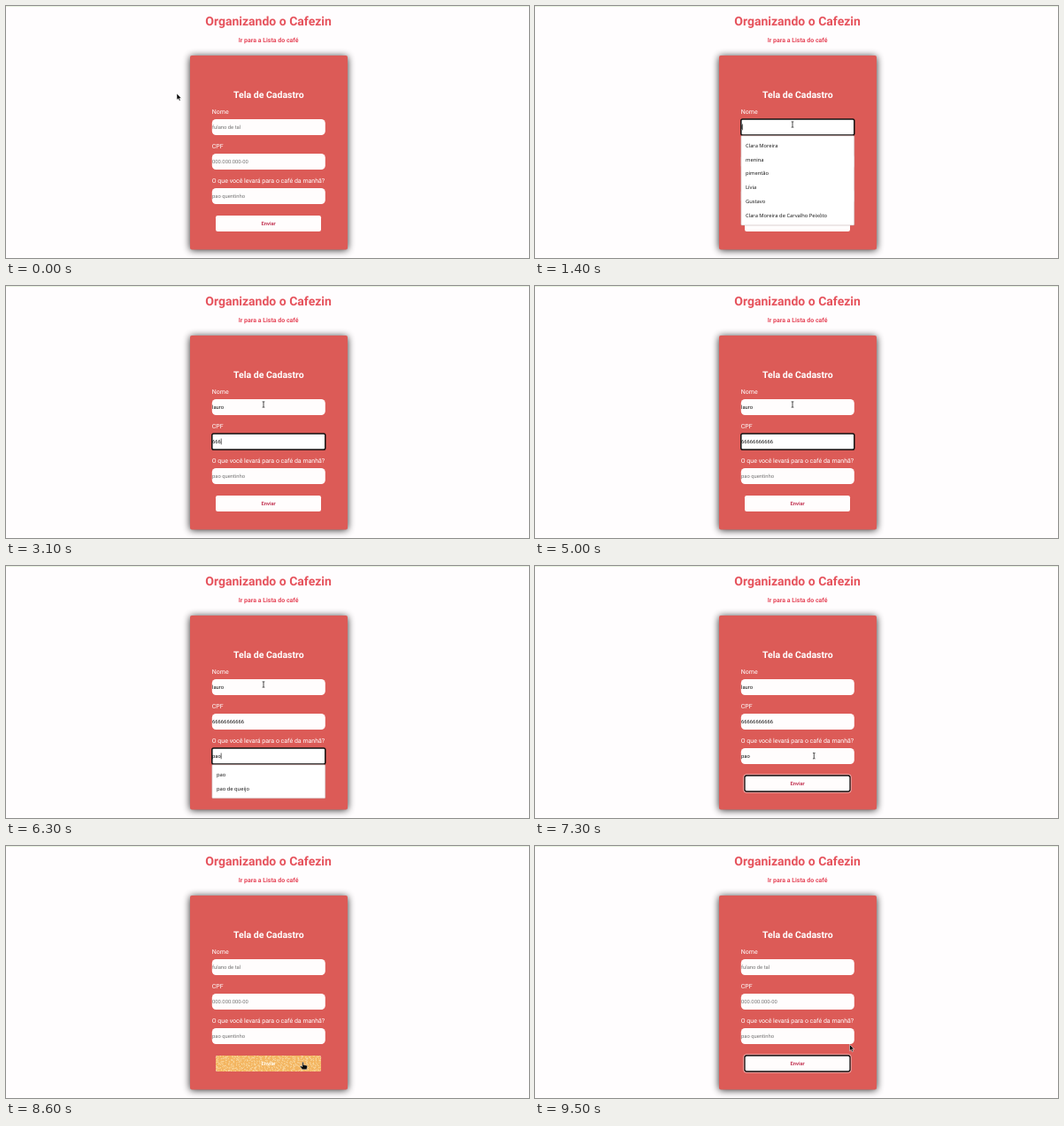
These frames come from a looping animation (591x285 px, 9600 ms). An HTML page:

```html
<!DOCTYPE html>
<html lang="pt-BR">
<head>
<meta charset="utf-8">
<title>Organizando o Cafezin</title>
<style>
  html, body { margin: 0; width: 100%; height: 100%; overflow: hidden; background: #fffdfe; }
  svg { display: block; width: 100%; height: 100%; }
  text { font-family: Roboto, sans-serif; font-size: 5.84px; text-rendering: geometricPrecision; white-space: pre; }
  .head { font-size: 14px; font-weight: 700; fill: #e6535d; text-anchor: middle; }
  .link { font-size: 7px; font-weight: 700; fill: #e6475a; text-anchor: middle; }
  .title { font-size: 10.5px; font-weight: 700; fill: #fff; text-anchor: middle; }
  .label { font-size: 7px; fill: #fff; }
  .send { font-weight: 700; text-anchor: middle; }
  .option { font-family: "Noto Sans", sans-serif; font-size: 5.78px; font-weight: 500; fill: #1c1c1c; }
</style>
</head>
<body>
<svg id="stage" viewBox="0 0 591 285">
  <defs>
    <filter id="blur" x="-20%" y="-20%" width="140%" height="140%"><feGaussianBlur stdDeviation="4"/></filter>
    <clipPath id="buttonClip"><rect x="237" y="237" width="119" height="18" rx="2.2"/></clipPath>
  </defs>
  <rect width="591" height="285" fill="#fffdfe"/>
  <rect width="591" height="1" fill="#e8f1df"/>
  <text class="head" x="296.6" y="22">Organizando o Cafezin</text>
  <text class="link" x="296.6" y="41">Ir para a Lista do café</text>
  <rect x="208" y="57" width="178" height="219" rx="2" opacity=".85" filter="url(#blur)"/>
  <rect x="208" y="56" width="178" height="219.5" rx="2" fill="#dc5b57"/>
  <text class="title" x="296.8" y="104.2">Tela de Cadastro</text>
</svg>
<script>
const LOOP = 9600, STEP = 100, RESET = 8000;
const stage = document.getElementById('stage');

function add(tag, attrs, parent = stage, text = '') {
  const node = document.createElementNS('http://www.w3.org/2000/svg', tag);
  for (const key in attrs) node.setAttribute(key, attrs[key]);
  node.textContent = text;
  parent.appendChild(node);
  return node;
}
const show = (node, on) => node.setAttribute('visibility', on ? 'visible' : 'hidden');
const within = (t, [from, to]) => t >= from && t < to;

const fields = [
  { label: 'Nome', hint: 'fulano de tal', value: 'lauro', y: 128, focus: [1100, 2600],
    keys: [1400, 1500, 1500, 1600, 1600], open: [1100, 1500],
    options: ['Clara Moreira', 'menina', 'pimentão', 'Lívia', 'Gustavo', 'Clara Moreira de Carvalho Peixôto'] },
  { label: 'CPF', hint: '000.000.000-00', value: '66666666666', y: 167, focus: [2600, 5600],
    keys: [2900, 3000, 3100, 3300, 3400, 3500, 3700, 3800, 3900, 4100, 4200] },
  { label: 'O que você levará para o café da manhã?', hint: 'pao quentinho', value: 'pao', y: 206,
    focus: [5600, 6700], keys: [6000, 6100, 6300], open: [6000, 6700], options: ['pao', 'pao de queijo'] }
];
const caretOff = [[2300, 2600], [4700, 5600]];

for (const f of fields) {
  add('text', { class: 'label', x: 232.8, y: f.y - 5.8 }, stage, f.label);
  add('rect', { x: 232.8, y: f.y, width: 128, height: 18, rx: 4.6, fill: '#fffdfd' });
  f.ring = add('rect', { x: 232.8, y: f.y, width: 128, height: 18, rx: 1.8, fill: '#fff', stroke: '#111', 'stroke-width': 1.5 });
  f.text = add('text', { x: 233, y: f.y + 11 });
  f.caret = add('rect', { y: f.y + 5.5, width: 0.6, height: 6.8, fill: '#000' });
}

// Send button: plain, focused and patterned hover looks
const button = { x: 237, y: 237, width: 119, height: 18, rx: 2.2 };
add('rect', { ...button, fill: '#fffdfd' });
const ring = add('g', { fill: 'none' });
add('rect', { x: 235.9, y: 235.9, width: 121.2, height: 20.2, rx: 2.6, stroke: '#fff', 'stroke-width': 0.6 }, ring);
add('rect', { ...button, stroke: '#151515', 'stroke-width': 1.3 }, ring);
const hover = add('g', { 'clip-path': 'url(#buttonClip)' });
add('rect', { ...button, fill: '#f3b560' }, hover);
let seed = 11;
const random = () => (seed = seed * 16807 % 2147483647) / 2147483647;
let squiggles = '';
for (let row = 0; row < 8; row++) {
  for (let col = 0; col < 42; col++) {
    const x = 236.5 + col * 2.9 + random() * 1.6, y = 237.6 + row * 2.4 + random() * 1.2;
    const bend = () => ((random() - 0.5) * 3.4).toFixed(1);
    squiggles += `M${x.toFixed(1)} ${y.toFixed(1)}q${bend()} ${bend()} ${bend()} ${bend()}`;
  }
}
add('path', { d: squiggles, fill: 'none', stroke: '#fbe3b4', 'stroke-width': 0.75, 'stroke-linecap': 'round' }, hover);
const send = add('text', { class: 'send', x: 296.6, y: 248 }, stage, 'Enviar');

for (const f of fields) {
  if (!f.options) continue;
  const top = f.y + 18.7;
  f.list = add('g', {});
  add('rect', { x: 232.8, y: top, width: 128, height: f.options.length * 15.8 + 6.5, rx: 1,
    fill: '#fff', stroke: '#b9a3a3', 'stroke-width': 0.5 }, f.list);
  f.options.forEach((name, i) =>
    add('text', { class: 'option', x: 238, y: top + 13 + i * 15.8 }, f.list, name));
}

const cursors = {
  arrow: add('path', { d: 'M0 0V7.2L1.7 5.7L2.9 8.3L4.1 7.8L3 5.2H5.2Z', fill: '#0a0a0a', stroke: '#fff', 'stroke-width': 0.5 }),
  beam: add('path', { d: 'M-1.3 -3.2H-.5Q0 -3.2 0 -2.6V2.6Q0 3.2 -.5 3.2H-1.3M1.3 -3.2H.5Q0 -3.2 0 -2.6M0 2.6Q0 3.2 .5 3.2H1.3',
    fill: 'none', stroke: '#222', 'stroke-width': 0.8 }),
  hand: add('path', { d: 'M-.7 .2Q0 -.7 .7 .2V3L4.3 3.7Q5.2 4 5 5.2L4.3 8.2H-.6L-3 5.2Q-3 4 -1.9 4.3L-.7 5.2Z',
    fill: '#0a0a0a', stroke: '#fff', 'stroke-width': 0.4 })
};

// time, x, y
const path = [
  [0, 193, 99], [600, 291, 134], [6800, 291, 134], [7600, 326.5, 252], [7800, 326, 250],
  [7900, 326, 249], [8200, 326, 249], [9000, 345, 240], [9500, 355.5, 224.5], [LOOP, 355.5, 224.5]
];
function pointerAt(t) {
  const i = path.findIndex(p => p[0] > t);
  const [t0, x0, y0] = path[i - 1], [t1, x1, y1] = path[i];
  const k = (t - t0) / (t1 - t0), e = k * k * (3 - 2 * k);
  return [x0 + (x1 - x0) * e, y0 + (y1 - y0) * e];
}
const inside = (x, y, left, top, width) => x >= left && x <= left + width && y >= top && y <= top + 18;

function render(t) {
  for (const f of fields) {
    const count = t < RESET ? f.keys.filter(k => k <= t).length : 0;
    const focused = within(t, f.focus);
    f.text.textContent = count ? f.value.slice(0, count) : f.hint;
    f.text.setAttribute('fill', count ? '#161616' : '#757575');
    f.caret.setAttribute('x', 233 + (count ? f.text.getComputedTextLength() : 0.3));
    show(f.ring, focused);
    show(f.caret, focused && !caretOff.some(span => within(t, span)));
    if (f.list) show(f.list, within(t, f.open));
  }
  const [x, y] = pointerAt(t);
  const onButton = inside(x, y, 237, 237, 119);
  const onField = fields.some(f => inside(x, y, 232.8, f.y, 128));
  const kind = onButton ? 'hand' : onField && t < 9000 ? 'beam' : 'arrow';
  for (const name in cursors) show(cursors[name], name === kind);
  cursors[kind].setAttribute('transform', `translate(${x.toFixed(2)} ${y.toFixed(2)})`);
  show(hover, onButton);
  show(ring, t >= 6700 && !onButton);
  send.setAttribute('fill', onButton ? '#fff6e6' : '#c43a58');
}

const start = performance.now();
function tick() {
  const t = (performance.now() - start) % LOOP;
  render(Math.floor(t / STEP) * STEP);
  requestAnimationFrame(tick);
}
tick();
</script>
</body>
</html>
```
